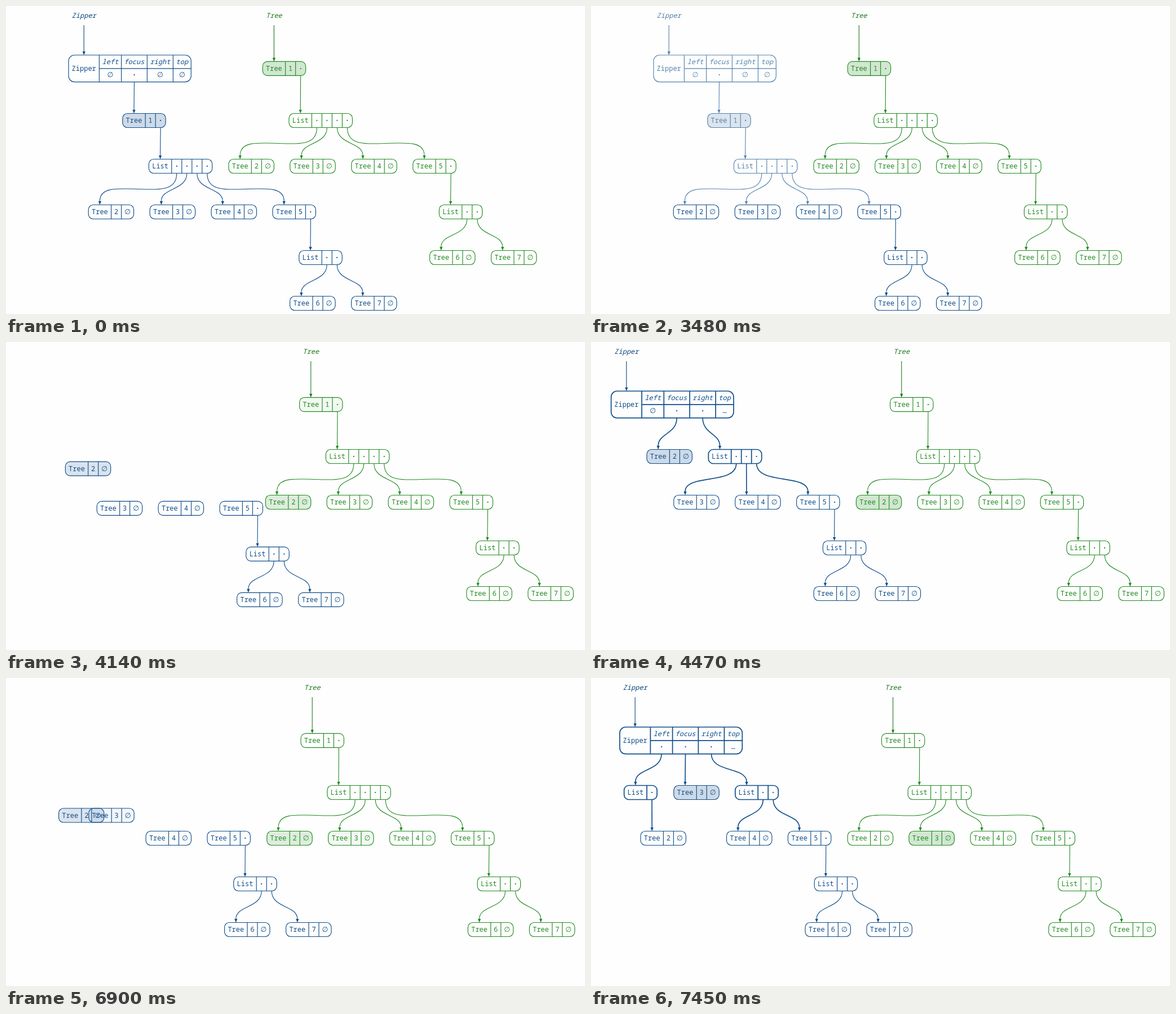
An HTML page for the animation above (8 s loop, 1027 by 546 pixels).

```html
<!DOCTYPE html>
<html lang="en">
<head>
<meta charset="utf-8">
<title>Tree and zipper</title>
<style>
  html, body { margin: 0; width: 100%; height: 100%; overflow: hidden; background: #fefefe; }
  svg { display: block; width: 100%; height: 100%; }
  text { font: 12px "Noto Sans Mono", "DejaVu Sans Mono", monospace; text-anchor: middle; stroke: none; }
  .it { font-style: italic; }
  .dot { font-weight: bold; }
  .empty { font-family: "DejaVu Sans", sans-serif; font-size: 12.5px; }
</style>
</head>
<body>
<svg id="stage" viewBox="0 0 1027 546"></svg>
<script>
const LOOP = 8000, STEP = 110;
const BLUE = { main: '#104e8b', dark: '#0f467c' };
const GREEN = { main: '#228b22', dark: '#1f781f' };
const ROWS = [110.8, 203, 284, 365, 446, 527];
const HEAD = 40.4, CELL = 18, EMPTY = 22, HALF = 12.5;
const ZIP_X = [0, 54.4, 93.6, 139.4, 185.4, 217.3];
const ZIP_NAMES = ['left', 'focus', 'right', 'top'];
const GLYPH_CLASS = { '∅': 'empty', '·': 'dot' };

const clamp = v => Math.max(0, Math.min(1, v));
const mix = (a, b, k) => a + (b - a) * k;

// Nodes
const tree = (n, x, row, leaf = true) =>
  ['t' + n, { x, y: ROWS[row], title: 'Tree', cells: [String(n), leaf ? '∅' : '·'] }];
const list = (id, size, x, row, bold) =>
  [id, { x, y: ROWS[row], title: 'List', cells: Array(size).fill('·'), bold }];
const zipper = (id, x, cells, bold) =>
  [id, { x, y: ROWS[0], title: 'Zipper', label: 'Zipper', cells: [...cells], bold }];

// Edges: [from, cell, to]
const fan = (from, ...targets) => targets.map((to, i) => [from, i, to]);
const SUBTREE = [['t5', 1, 'sub'], ...fan('sub', 't6', 't7')];

function blueScene(focus, nodes, edges) {
  return { focus, color: BLUE, nodes: Object.fromEntries(nodes), edges: [...edges, ...SUBTREE] };
}

function greenScene(focus, dx) {
  const nodes = Object.fromEntries([
    tree(1, 455.2 + dx, 0, false), list('kids', 4, 502 + dx, 1),
    tree(2, 395 + dx, 2), tree(3, 503.8 + dx, 2), tree(4, 612.8 + dx, 2), tree(5, 721.8 + dx, 2, false),
    list('sub', 2, 768.4 + dx, 3), tree(6, 751.6 + dx, 4), tree(7, 860.6 + dx, 4)
  ]);
  nodes.t1.label = 'Tree';
  const edges = [['t1', 1, 'kids'], ...fan('kids', 't2', 't3', 't4', 't5'), ...SUBTREE];
  return { focus, color: GREEN, nodes, edges };
}

const blue = [
  blueScene('t1', [
    zipper('zipA', 111, '∅·∅∅'), tree(1, 206.8, 1, false), list('kids', 4, 253.4, 2),
    tree(2, 146.2, 3), tree(3, 255.2, 3), tree(4, 364.1, 3), tree(5, 473, 3, false),
    list('sub', 2, 519.8, 4), tree(6, 503.6, 5), tree(7, 612.6, 5)
  ], [['zipA', 1, 't1'], ['t1', 1, 'kids'], ...fan('kids', 't2', 't3', 't4', 't5')]),
  blueScene('t2', [
    zipper('zipB', 35.7, '∅··…', true), tree(2, 99, 1), list('rightB', 3, 208.3, 1, true),
    tree(3, 146.8, 2), tree(4, 255.7, 2), tree(5, 364.6, 2, false),
    list('sub', 2, 411.4, 3), tree(6, 395.2, 4), tree(7, 504.2, 4)
  ], [['zipB', 1, 't2'], ['zipB', 2, 'rightB'], ...fan('rightB', 't3', 't4', 't5')]),
  blueScene('t3', [
    zipper('zipC', 51, '···…', true), list('leftC', 1, 58.7, 1, true), tree(2, 88, 2),
    tree(3, 146.8, 1), list('rightC', 2, 255.8, 1, true),
    tree(4, 240.5, 2), tree(5, 349.4, 2, false),
    list('sub', 2, 396.2, 3), tree(6, 380, 4), tree(7, 489, 4)
  ], [...fan('zipC', 'leftC', 't3', 'rightC'), ['leftC', 0, 't2'], ...fan('rightC', 't4', 't5')])
];
const green = [greenScene('t1', 0), greenScene('t2', 75.4), greenScene('t3', 60.2)];

// Drawing
const isZip = n => n.title === 'Zipper';
const halfHeight = n => isZip(n) ? 23.8 : HALF;
const weight = n => n.bold ? 1.7 : 1.15;

function bounds(n) {
  if (isZip(n)) return ZIP_X;
  const xs = [0, HEAD];
  for (const c of n.cells) xs.push(xs[xs.length - 1] + (c === '∅' ? EMPTY : CELL));
  return xs;
}

function center(n, i) {
  const xs = bounds(n);
  return n.x + (xs[i] + xs[i + 1]) / 2;
}

function text(x, y, s, fill, cls = GLYPH_CLASS[s] || '') {
  return `<text x="${x}" y="${y + 4}" class="${cls}" fill="${fill}">${s}</text>`;
}

function drawNode(n, color, tint) {
  const xs = bounds(n), h = halfHeight(n), zip = isZip(n), top = n.y - h;
  const width = xs[xs.length - 1];
  let lines = xs.slice(1, -1).map(x => `M${n.x + x},${top}v${2 * h}`).join('');
  if (zip) lines += `M${n.x + xs[1]},${n.y}H${n.x + width}`;
  let out = `<g stroke="${color.main}" stroke-width="${weight(n)}">
    <rect x="${n.x}" y="${top}" width="${width}" height="${2 * h}" rx="${zip ? 10.5 : 8.5}"
      fill="${color.main}" fill-opacity="${0.2 * tint}"/><path d="${lines}" fill="none"/></g>`;
  out += text(center(n, 0), n.y, n.title, color.main);
  n.cells.forEach((c, i) => {
    const x = center(n, i + 1);
    if (zip) out += text(x, n.y - 12.3, ZIP_NAMES[i], color.main, 'it');
    out += text(x, n.y + (zip ? 11.2 : 0), c, color.main);
  });
  if (n.label) {
    const x = center(n, 0);
    out += text(x, 17.3, n.label, color.dark, 'it') + drawEdge(x, 34, x, top, color.dark, 1.1);
  }
  return out;
}

// Curves are symmetric about the middle of the gap; the arrowhead covers the end.
function drawEdge(x0, y0, x1, tip, stroke, width) {
  const y1 = tip - 6.5, dx = x1 - x0, span = Math.abs(dx);
  let d = `M${x0},${y0}`;
  if (span < 2) d += `L${x1},${y1}`;
  else if (span < 110) {
    const h = 23 + span * 0.17;
    d += `C${x0},${y0 + h} ${x1},${tip - h} ${x1},${y1}`;
  } else {
    const mx = x0 + dx / 2, my = (y0 + tip) / 2;
    d += `C${x0},${my + 4} ${x0 + dx * 0.23},${my + 1} ${mx},${my}`
       + `S${x1},${my - 4} ${x1},${y1}`;
  }
  return `<path d="${d}" fill="none" stroke="${stroke}" stroke-width="${width}"/>
    <path d="M${x1 - 2.6},${y1}h5.2L${x1},${tip}z" fill="${stroke}"/>`;
}

const group = (opacity, body) => opacity > 0 ? `<g opacity="${opacity}">${body}</g>` : '';

// Shared parts move, the others fade out before or fade in after the move.
function drawScene(a, b, { leave, move, enter }) {
  const shown = (inA, inB) => inA && inB ? 1 : inA ? 1 - leave : enter;
  const nodes = {};
  let out = '';
  for (const id of new Set([...Object.keys(a.nodes), ...Object.keys(b.nodes)])) {
    const p = a.nodes[id], q = b.nodes[id];
    nodes[id] = p && q ? { ...p, x: mix(p.x, q.x, move), y: mix(p.y, q.y, move) } : p || q;
    const tint = mix(id === a.focus && p ? 1 : 0, id === b.focus && q ? 1 : 0, p && q ? move * move : p ? 0 : 1);
    out += group(shown(p, q), drawNode(nodes[id], a.color, tint));
  }
  const keysA = new Set(a.edges.map(String)), keysB = new Set(b.edges.map(String));
  for (const key of new Set([...keysA, ...keysB])) {
    const [from, cell, to] = key.split(','), n = nodes[from], m = nodes[to];
    const edge = drawEdge(center(n, +cell + 1), n.y + halfHeight(n), center(m, 0), m.y - halfHeight(m),
      a.color.main, weight(n) - 0.05);
    out += group(shown(keysA.has(key), keysB.has(key)), edge);
  }
  return out;
}

// Timeline: one second per change, sampled every STEP ms
const FIRST = 3480, SECOND = 6460, LEAD = 60;
const stage = document.getElementById('stage');
let last = '';

function tick(now) {
  const t = now % LOOP;
  const from = t < SECOND ? 0 : 1;
  const since = t - (from ? SECOND : FIRST);
  const s = since < 0 ? 0 : Math.min(1000, LEAD + STEP * Math.floor(since / STEP));
  const key = from + ':' + s;
  if (key !== last) {
    last = key;
    const phase = { leave: clamp(s / 200), move: clamp((s - 200) / 600), enter: clamp((s - 800) / 200) };
    stage.innerHTML = [blue, green].map(set => drawScene(set[from], set[from + 1], phase)).join('');
  }
}

const start = performance.now();
function frame() {
  tick(performance.now() - start);
  requestAnimationFrame(frame);
}
frame();
</script>
</body>
</html>
```
